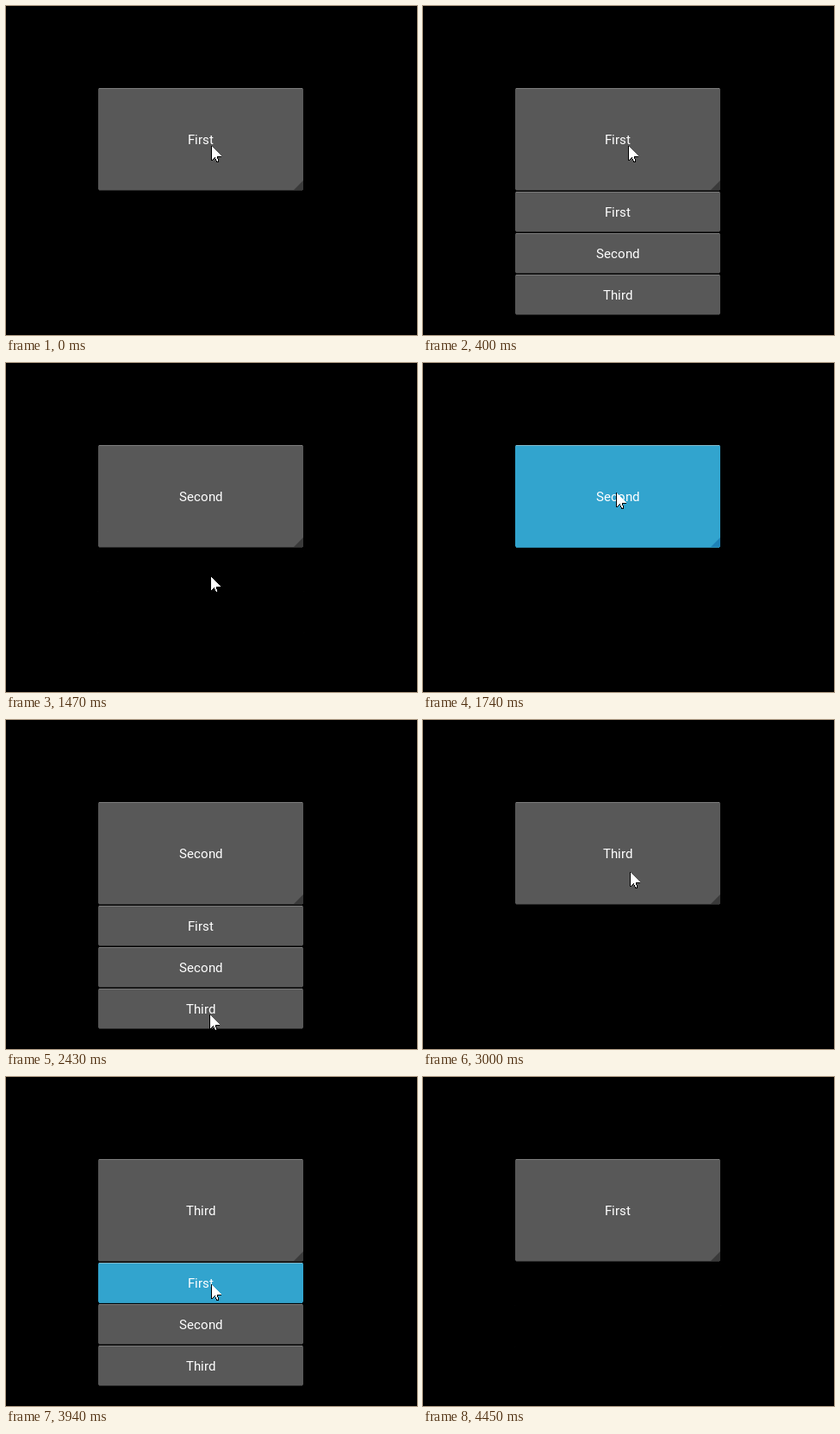
An HTML page that plays this animation: 477 by 381 pixels, repeating every 5.04 s.

```html
<!DOCTYPE html>
<html lang="en">
<head>
<meta charset="utf-8">
<title>Spinner</title>
<style>
  html, body { margin: 0; width: 100%; height: 100%; overflow: hidden; background: #000; }
  svg { display: block; width: 477px; height: 381px; }
  text { font: 15px Roboto, sans-serif; fill: #fff; }
</style>
</head>
<body>
<svg id="stage" viewBox="0 0 477 381"></svg>
<script>
const LOOP = 5040;
const TICK = 135;
const CURSOR_GONE = 4450;
const OPTIONS = ['First', 'Second', 'Third'];
const GREY = { fill: '#585858', top: '#7b7b7b', bottom: '#2c2c2c', corner: '#3a3a3a' };
const BLUE = { fill: '#32a4ce', top: '#82b7c8', bottom: '#2b8db1', corner: '#1e82b7' };

const smooth = p => p * p * (3 - 2 * p);
const slowing = p => 1 - (1 - p) ** 2;

// Each visit: press the button, the list opens, touch an option, it is picked.
const VISITS = [
  { press: 280, open: 400, touch: 1470, pick: 1470, choice: 'Second' },
  { press: 1740, open: 1860, touch: 2580, pick: 2580, choice: 'Third' },
  { press: 3120, open: 3120, touch: 3940, pick: 4060, choice: 'First' }
];

const HOME = { x: 238, y: 162 };
const MOVES = [
  { start: 800, end: 1070, x: 242, y: 281, ease: slowing },
  { start: 1470, end: 1740, x: 224, y: 150, ease: smooth },
  { start: 1860, end: 2160, x: 236, y: 341, ease: smooth },
  { start: 2580, end: 2880, x: 240, y: 176, ease: smooth },
  { start: 3120, end: 3540, x: 238, y: 240, ease: slowing },
  { start: 4060, end: 4300, x: 364, y: 313, ease: smooth }
];

const stage = document.getElementById('stage');
const ruler = document.createElement('canvas').getContext('2d');
ruler.font = '15px Roboto, sans-serif';

function add(parent, tag, attrs = {}) {
  const node = document.createElementNS('http://www.w3.org/2000/svg', tag);
  for (const name in attrs) node.setAttribute(name, attrs[name]);
  return parent.appendChild(node);
}

// Centres a label whose letters advance by whole pixels.
function setLabel(node, label) {
  if (node.textContent === label) return;
  const advances = [...label].map(letter => Math.round(ruler.measureText(letter).width));
  let x = 226 - Math.floor(advances.reduce((sum, width) => sum + width) / 2);
  node.setAttribute('x', advances.map(width => (x += width) - width).join(' '));
  node.textContent = label;
}

function makeButton(parent, y, height, label, hasCorner) {
  const left = 107, width = 238, right = left + width, bottom = y + height;
  const group = add(parent, 'g');
  const line = lineY => add(group, 'rect', { x: left + 1, y: lineY, width: width - 2, height: 1 });
  const parts = {
    fill: add(group, 'rect', { x: left, y, width, height: height - 1, rx: 1.5 }),
    top: line(y),
    bottom: line(bottom - 1)
  };
  if (hasCorner) {
    parts.corner = add(group, 'path', { d: `M${right} ${bottom - 12}v11h-11Z` });
  }
  const text = add(group, 'text', { y: Math.floor(y + height / 2) + 6 });
  setLabel(text, label);
  return {
    text,
    paint(colors) {
      for (const name in parts) parts[name].setAttribute('fill', colors[name]);
    }
  };
}

const main = makeButton(stage, 95, 119, OPTIONS[0], true);
const list = add(stage, 'g');
const items = OPTIONS.map((label, i) => makeButton(list, 215 + 48 * i, 47, label));
const cursor = add(stage, 'g', { 'shape-rendering': 'crispEdges' });
add(cursor, 'path', { d: 'M0-.5L12 11.5V13H8L9.5 18L8.5 19H6.5L4.5 14L1 17H0Z' });
add(cursor, 'path', { d: 'M1 .5L12.5 12H7V13L8.5 18H7L4.5 13L1 16Z', fill: '#fff' });

// The pointer advances in even jumps, the first one at the start of the move.
function cursorAt(time) {
  let from = HOME;
  for (const move of MOVES) {
    if (time < move.start) break;
    const gaps = Math.round((move.end - move.start) / TICK);
    const jump = Math.floor((time - move.start) / (move.end - move.start) * gaps);
    const part = move.ease(Math.min(1, (jump + 1) / (gaps + 1)));
    const mix = axis => Math.round(from[axis] + (move[axis] - from[axis]) * part);
    if (time < move.end) return { x: mix('x'), y: mix('y') };
    from = move;
  }
  return from;
}

function render(time) {
  const within = (from, to) => time >= from && time < to;
  const toggle = (node, shown) => { node.style.display = shown ? '' : 'none'; };
  const picked = VISITS.filter(visit => time >= visit.pick).pop();
  const touched = VISITS.find(visit => within(visit.touch, visit.pick));

  setLabel(main.text, picked ? picked.choice : OPTIONS[0]);
  main.paint(VISITS.some(visit => within(visit.press, visit.open)) ? BLUE : GREY);
  items.forEach((item, i) => {
    item.paint(touched && touched.choice === OPTIONS[i] ? BLUE : GREY);
  });
  toggle(list, VISITS.some(visit => within(visit.open, visit.pick)));
  toggle(cursor, time < CURSOR_GONE);
  const { x, y } = cursorAt(time);
  cursor.setAttribute('transform', `translate(${x} ${y})`);
}

const begin = performance.now();
function tick() {
  render((performance.now() - begin) % LOOP);
  requestAnimationFrame(tick);
}
tick();
</script>
</body>
</html>
```
